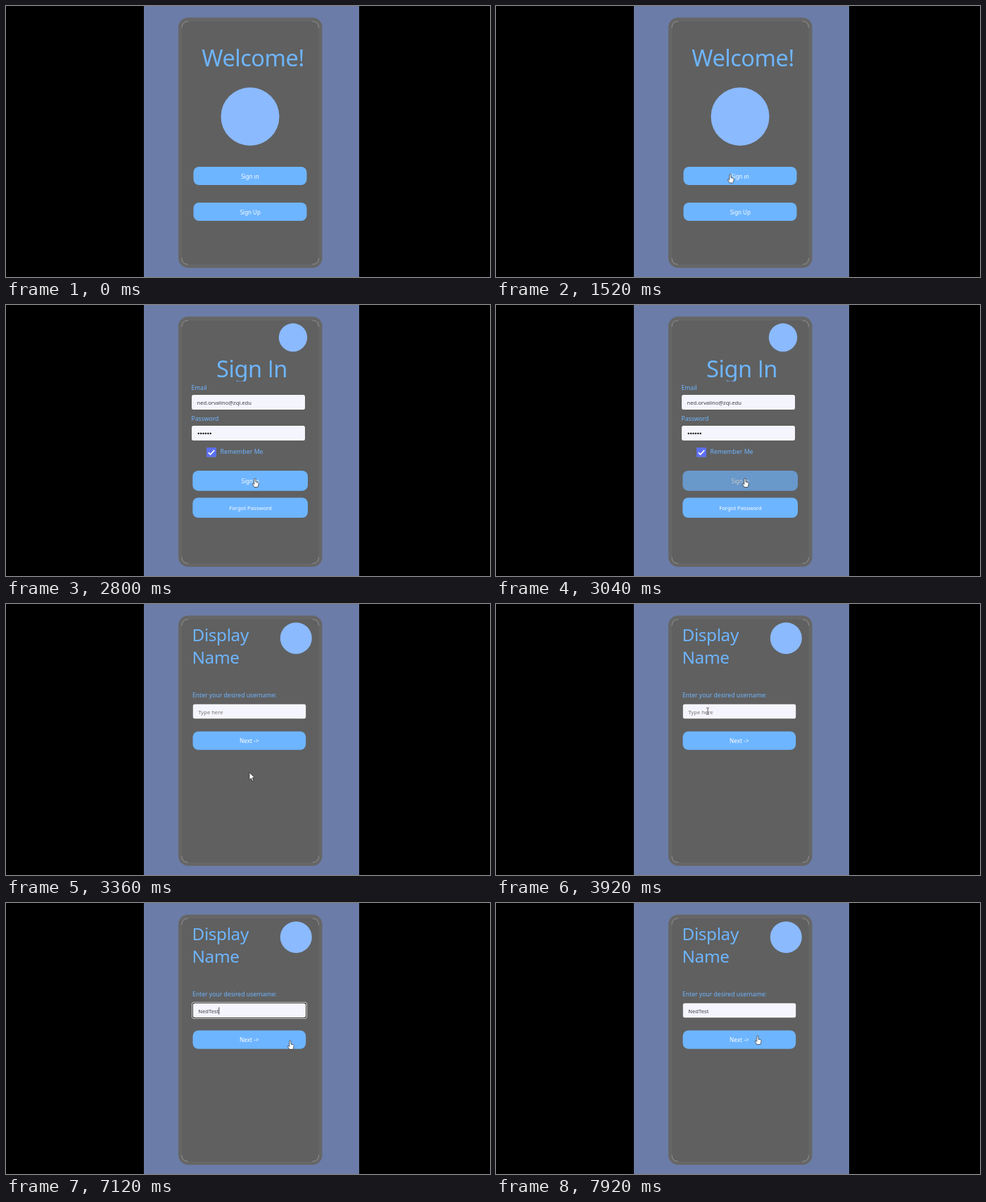
Recreate the animation shown at these times as an HTML page. Size 688 by 386 pixels, loop 8 s.

```html
<!DOCTYPE html>
<html lang="en">
<head>
<meta charset="utf-8">
<title>Sign-in walkthrough</title>
<style>
  html, body { margin: 0; width: 100%; height: 100%; overflow: hidden; background: #000; }
  svg { display: block; width: 688px; height: 386px; }
  text { font: 8px "Noto Sans", "Open Sans", sans-serif; fill: #6eb5ff; white-space: pre; }
  .mid { text-anchor: middle; }
  .title { font-size: 32.5px; letter-spacing: -.45px; }
  .name { font-size: 24.3px; letter-spacing: -.35px; }
  .label { font-size: 8.6px; }
  .value { font-size: 7.6px; fill: #3c3c42; }
  .btn text { fill: #fff; text-anchor: middle; }
  .btn rect { fill: #6eb5ff; }
  .plain { font-family: "Open Sans", sans-serif; }
  .field { fill: #f5f5fd; }
  .logo { fill: #8bbaff; }

  /* One loop is 8 s, so 1% is one 80 ms step. */
  .step { animation: 8s step-end infinite; }
  #welcome { animation-name: welcome; }
  #signin { animation-name: signin; }
  #display { animation-name: display; }
  #open { animation-name: open; }
  #enter { animation-name: enter; }
  #check { animation-name: check; }
  #focus { animation-name: focus; }
  #cursor { animation-name: move; }
  #arrow { animation-name: arrow; }
  #hand { animation-name: hand; }
  #beam { animation-name: beam; }

  @keyframes welcome { 0% { opacity: 1 } 23%, 100% { opacity: 0 } }
  @keyframes signin { 0% { opacity: 0 } 23% { opacity: 1 } 40%, 100% { opacity: 0 } }
  @keyframes display { 0% { opacity: 0 } 40%, 100% { opacity: 1 } }
  @keyframes open { 0% { opacity: 1 } 21% { opacity: .67 } 23%, 100% { opacity: 1 } }
  @keyframes enter { 0% { opacity: 1 } 37% { opacity: .67 } 40%, 100% { opacity: 1 } }
  @keyframes check { 0% { opacity: 0 } 29%, 100% { opacity: 1 } }
  @keyframes focus { 0% { opacity: 0 } 55% { opacity: 1 } 99%, 100% { opacity: 0 } }

  @keyframes arrow {
    0% { opacity: 0 } 14% { opacity: 1 } 17% { opacity: 0 }
    24% { opacity: 1 } 27% { opacity: 0 } 32% { opacity: 1 } 34% { opacity: 0 }
    41% { opacity: 1 } 44% { opacity: 0 } 46% { opacity: 1 } 48% { opacity: 0 }
    56% { opacity: 1 } 57%, 100% { opacity: 0 }
  }
  @keyframes hand {
    0% { opacity: 0 } 17% { opacity: 1 } 24% { opacity: 0 }
    27% { opacity: 1 } 32% { opacity: 0 } 34% { opacity: 1 } 41% { opacity: 0 }
    44% { opacity: 1 } 46% { opacity: 0 } 57%, 100% { opacity: 1 }
  }
  @keyframes beam { 0% { opacity: 0 } 48% { opacity: 1 } 56%, 100% { opacity: 0 } }

  @keyframes move {
    0%, 14% { transform: translate(217px, 157px) }
    15% { transform: translate(262px, 186px) }
    16% { transform: translate(312px, 222px) }
    17% { transform: translate(357px, 247px) }
    18% { transform: translate(344px, 245px) }
    19% { transform: translate(333px, 239.5px) }
    24% { transform: translate(328px, 232px) }
    25% { transform: translate(318px, 222px) }
    26% { transform: translate(306px, 212px) }
    27% { transform: translate(298px, 204.5px) }
    31% { transform: translate(295px, 213px) }
    32% { transform: translate(308px, 222px) }
    33% { transform: translate(328px, 233px) }
    34% { transform: translate(345px, 243px) }
    35% { transform: translate(354px, 247px) }
    42% { transform: translate(346px, 240px) }
    43% { transform: translate(334px, 222px) }
    44% { transform: translate(320px, 203px) }
    45% { transform: translate(308px, 186px) }
    46% { transform: translate(301px, 178px) }
    47% { transform: translate(298px, 168px) }
    48% { transform: translate(301px, 158px) }
    49% { transform: translate(301px, 152.5px) }
    56% { transform: translate(336px, 166px) }
    57% { transform: translate(383px, 183px) }
    58% { transform: translate(412px, 185.5px) }
    88% { transform: translate(410px, 190px) }
    89% { transform: translate(404px, 196px) }
    90% { transform: translate(396px, 200px) }
    91% { transform: translate(388px, 201px) }
    92% { transform: translate(381px, 199px) }
    93% { transform: translate(375px, 194px) }
    94% { transform: translate(373px, 191px) }
    95%, 100% { transform: translate(371.8px, 189px) }
  }
</style>
</head>
<body>
<svg viewBox="0 0 688 386">
  <defs>
    <clipPath id="line"><rect x="290" y="60" width="130" height="48.7"/></clipPath>
  </defs>
  <rect width="688" height="386"/>
  <rect x="196" width="306" height="386" fill="#6b7ca8"/>
  <rect x="245" y="16.5" width="204.5" height="356.5" rx="14" fill="#666"/>
  <rect x="250" y="22" width="194.5" height="346" rx="10" fill="#606060"/>
  <path d="M250 31q0-9 9-9M435.500 22q9 0 9 9M444.500 359q0 9-9 9M259 368q-9 0-9-9"
        fill="none" stroke="#a0a0a0" stroke-width=".7"/>

  <g id="welcome" class="step">
    <text class="title mid" x="351" y="85.500">Welcome!</text>
    <circle class="logo" cx="347" cy="157.500" r="41.500"/>
    <g id="open" class="step btn">
      <rect x="266.500" y="229" width="161" height="26" rx="8"/>
      <text x="347" y="245.500">Sign <tspan class="plain">I</tspan>n</text>
    </g>
    <g class="btn">
      <rect x="266.500" y="280" width="161" height="26" rx="8"/>
      <text x="347.300" y="296.500">Sign Up</text>
    </g>
  </g>

  <g id="signin" class="step">
    <circle class="logo" cx="408" cy="46.300" r="20.200"/>
    <g clip-path="url(#line)">
      <text class="title mid" x="349.500" y="102.500">Sign <tspan class="plain">I</tspan>n</text>
    </g>
    <text class="label" x="263.500" y="120.500">Email</text>
    <rect class="field" x="264" y="128" width="161" height="21" rx="2.500"/>
    <text class="value" x="271.500" y="142">ned.orvalino@zqi.edu</text>
    <text class="label" x="263.500" y="165">Password</text>
    <rect class="field" x="264" y="172" width="161" height="21" rx="2.500"/>
    <path d="M273.700 183h18" stroke="#222" stroke-width="2.500" stroke-linecap="round" stroke-dasharray="0 3.400"/>
    <rect x="285.500" y="203.500" width="13" height="12.500" rx="1" fill="#fff" stroke="#c8c8c8" stroke-width=".6"/>
    <g id="check" class="step">
      <rect x="285" y="203" width="14" height="13.500" rx="1.500" fill="#5b6ef0"/>
      <path d="M287.800 210.200l2.700 2.800 5.800-6.200" fill="none" stroke="#fff" stroke-width="1.800"/>
    </g>
    <text class="label" x="304.500" y="212" style="font-size:8.800px">Remember Me</text>
    <g id="enter" class="step btn">
      <rect x="265.300" y="236" width="163.700" height="28.700" rx="8"/>
      <text x="347.300" y="254">Sign in</text>
    </g>
    <g class="btn">
      <rect x="265.300" y="274.500" width="163.700" height="28.500" rx="8"/>
      <text x="347.500" y="292.300" style="font-size:7.700px">Forgot Password</text>
    </g>
  </g>

  <g id="display" class="step">
    <text class="name" x="264.500" y="52.700">Display</text>
    <text class="name" x="264.500" y="84.700">Name</text>
    <circle class="logo" cx="412.300" cy="48.700" r="22.500"/>
    <text class="label" x="265" y="133.300">Enter your desired username:</text>
    <g id="focus" class="step">
      <rect x="264" y="141" width="164" height="24" rx="4" fill="#fff"/>
      <rect x="264.800" y="141.800" width="162.400" height="22.400" rx="3.300" fill="#101010"/>
    </g>
    <rect class="field" x="265.800" y="142.800" width="160.400" height="20.400" rx="2.500"/>
    <text id="entry" class="value" x="273.300" y="156.700"></text>
    <rect id="caret" y="148.500" width=".8" height="10.200" fill="#222"/>
    <g class="btn">
      <rect x="265.500" y="181.500" width="160.700" height="26.300" rx="8"/>
      <text x="345.700" y="198.300" style="font-size:8.200px">Next -&gt;</text>
    </g>
  </g>

  <g id="cursor" class="step" fill="#fff" stroke="#222" stroke-width=".7" stroke-linejoin="round">
    <path id="arrow" class="step" d="M0 0v10.500l2.500-2.300 1.700 3.900 1.700-.8-1.700-3.700h3.200z"/>
    <path id="hand" class="step" d="M-1.200 1.300q0-1.100 1.100-1.100t1.100 1.100v3.700l3.200.8q1.200.4 1 1.800l-.7 3.200-.8 1.700h-4.700l-2.600-4q-.4-1.400.8-1.100l1.600 1z"/>
    <path id="beam" class="step" fill="none" d="M-2-4.500h1.500l.5.500.5-.5h1.500M0-4v8M-2 4.500h1.500l.5-.5.500.5h1.500"/>
  </g>
</svg>
<script>
  const LOOP = 8000;
  const user = "NedTest";
  // [time in ms, letters shown]
  const keys = [[5120, 1], [5280, 2], [5360, 3], [5840, 4], [5920, 5],
                [6400, 4], [6560, 5], [6640, 6], [6720, 7]];
  const entry = document.getElementById("entry");
  const caret = document.getElementById("caret");
  const within = (t, from, to) => t >= from && t < to;
  let start;

  function draw(now) {
    start ??= now;
    const t = (now - start) % LOOP;
    const count = keys.reduce((n, [at, letters]) => t >= at ? letters : n, 0);
    const text = count ? user.slice(0, count) : "Type here";
    if (entry.textContent !== text) {
      entry.textContent = text;
      entry.style.fill = count ? "" : "#777";
    }
    caret.setAttribute("x", 273.3 + (count ? entry.getComputedTextLength() : 0));
    const blink = within(t, 4960, 5120) || within(t, 7280, 7760);
    caret.style.opacity = within(t, 4400, 7920) && !blink ? 1 : 0;
    requestAnimationFrame(draw);
  }
  requestAnimationFrame(draw);
</script>
</body>
</html>
```
